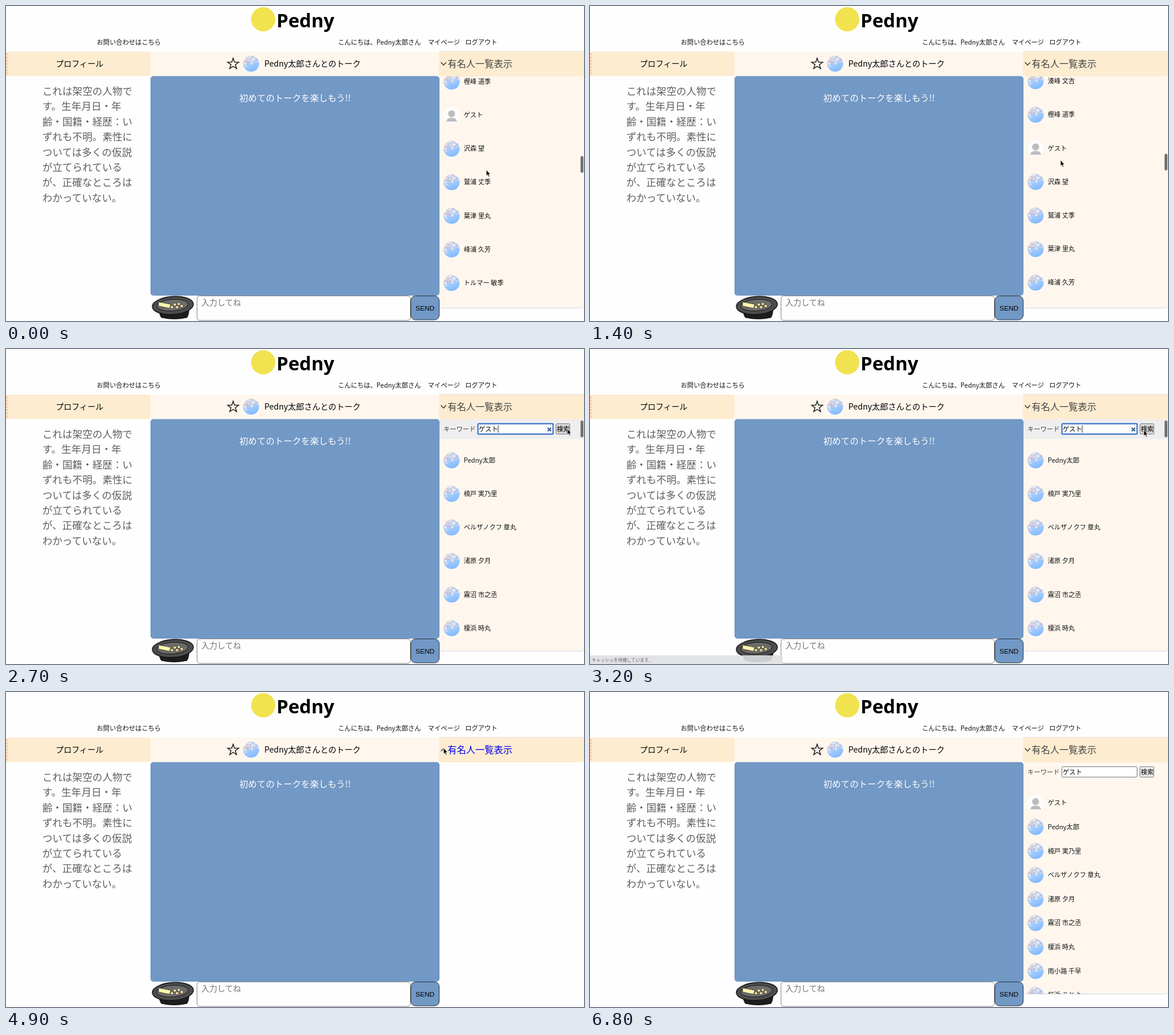
Animation of 1000x546 px, one loop 6900 ms. Source, as an HTML page:

```html
<!DOCTYPE html>
<html lang="ja">
<head>
<meta charset="utf-8">
<title>Pedny</title>
<style>
html, body { margin: 0; width: 100%; height: 100%; overflow: hidden; background: #fefefe; }
svg { display: block; width: 1000px; height: 546px; font-family: "Noto Sans CJK JP", "Noto Sans CJK", sans-serif; }
text { white-space: pre; }
</style>
</head>
<body>
<svg viewBox="0 0 1000 546">
  <defs>
    <clipPath id="panelClip"><path d="M750 122H1000V519Q1000 524 995 524H755Q750 524 750 519Z"/></clipPath>
    <clipPath id="disc"><circle r="14"/></clipPath>
    <linearGradient id="sky" x1=".3" x2=".7" y2="1">
      <stop offset=".1" stop-color="#d5dfee"/><stop offset=".55" stop-color="#a0cafc"/><stop offset="1" stop-color="#7eb7ff"/>
    </linearGradient>
    <g id="photo" clip-path="url(#disc)"><circle r="14" fill="url(#sky)"/></g>
    <g id="guest">
      <circle r="14" fill="#fdfdfd"/>
      <g fill="#bcbcbe"><circle cy="-2.5" r="6"/><path d="M-9 11Q-9 4.5 0 4.5T9 11Z"/></g>
    </g>
  </defs>

  <rect width="1000" height="546" fill="#fefefe"/>
  <circle cx="445" cy="23" r="21" fill="#f1e250"/>
  <text x="468" y="36.5" font-size="32.5" font-weight="700" style="font-family:'Noto Sans','Open Sans',sans-serif">Pedny</text>
  <g font-size="11.1" fill="#111">
    <text x="157" y="67">お問い合わせはこちら</text>
    <text x="574.5" y="67">こんにちは、Pedny太郎さん</text>
    <text x="730" y="67">マイページ</text>
    <text x="794.5" y="67">ログアウト</text>
  </g>

  <g id="panel" clip-path="url(#panelClip)">
    <rect x="750" y="122" width="250" height="403" fill="#fff7ee"/>
    <g id="list">
      <rect id="formBg" x="750" y="122" width="250" height="34" fill="#efeeee"/>
      <g font-size="11.1">
        <text x="757" y="142.5" fill="#444">キーワード</text>
        <rect id="field" x="816.5" y="129.5" width="130" height="18" rx="1" fill="#fff"/>
        <text id="word" x="818" y="142.5"></text>
        <path id="caret" d="M851.5 132.5V145" stroke="#333"/>
        <path id="clear" d="M937 136.5l6 6m0-6l-6 6" stroke="#2b5590" stroke-width="1.8"/>
        <rect id="button" x="951.5" y="129.5" width="24" height="18" rx="2" stroke="#767676"/>
        <text x="953" y="142.5">検索</text>
      </g>
      <g id="rows" font-size="11.1" fill="#111"></g>
    </g>
    <rect id="thumb" x="994" width="5" height="29" rx="2.5" fill="#757371"/>
    <path d="M750 519Q750 523.5 755 523.5H995Q1000 523.5 1000 519" fill="none" stroke="#d3d6e0"/>
  </g>

  <path d="M250 79H750V122H250Z" fill="#fff7ee"/>
  <rect y="79" width="250" height="42.5" rx="3" fill="#fdecd0"/>
  <rect x="749" y="78" width="251" height="44" rx="4" fill="#fdecd0"/>
  <path d="M750 78.5H1000" stroke="#e9e4df"/>
  <path d="M1 82V121" stroke="#f7c9a4" stroke-width="3.5" stroke-dasharray="3.5 2"/>
  <text x="86" y="105.3" font-size="13.8">プロフィール</text>
  <path id="star" fill="none" stroke="#111" stroke-width="1.4"/>
  <use href="#photo" x="424" y="100"/>
  <text x="447" y="105.3" font-size="14">Pedny太郎さんとのトーク</text>
  <path id="chevron" fill="none" stroke="#333" stroke-width="1.4"/>
  <text id="heading" x="764" y="106" font-size="16">有名人一覧表示</text>

  <g id="profile" font-size="17.3" fill="#5f5f5f"></g>
  <rect x="250" y="121.5" width="500" height="380.5" rx="5" fill="#7298c5"/>
  <text x="500" y="165" font-size="15.3" fill="#fff" text-anchor="middle">初めてのトークを楽しもう!!</text>

  <g stroke="#111" stroke-linejoin="round">
    <path d="M264 525Q266 537 269 540Q291 545 313 540Q316 536 317 524Z" fill="#1d1d1d"/>
    <ellipse cx="288.7" cy="519" rx="35.6" ry="15.6" transform="rotate(-4 288.7 519)" fill="#4c4c4c" stroke-width="1.4"/>
    <ellipse cx="288" cy="518.5" rx="27" ry="10" transform="rotate(-4 288 518.5)" fill="#6c6c6c" stroke-width=".9"/>
    <path d="M264 513L285 517 283 524 264 520Z" fill="#fff5ac" stroke-width=".6"/>
    <g fill="#f6e59a" stroke-width=".5">
      <circle cx="287" cy="522" r="2.5"/><circle cx="292" cy="517.5" r="2.5"/><circle cx="296" cy="522" r="2.5"/>
      <circle cx="299" cy="516.5" r="2.4"/><circle cx="304" cy="520" r="2.5"/>
    </g>
  </g>
  <rect x="330.5" y="502.5" width="369" height="42.5" rx="5" fill="#fefefe" stroke="#858585"/>
  <text x="338" y="519" font-size="13.8" fill="#757575">入力してね</text>
  <rect x="700.5" y="502.5" width="49" height="41.5" rx="8" fill="#7298c5" stroke="#2b3440"/>
  <text x="725" y="528" font-size="11.8" text-anchor="middle" style="font-family:'Liberation Sans',Arial,sans-serif">SEND</text>

  <g id="status">
    <path d="M0 531H330Q333 531 333 534V546H0Z" fill="#dfe0e3" fill-opacity=".9"/>
    <text x="3" y="541.5" font-size="7.6" fill="#666">キャッシュを待機しています...</text>
  </g>
  <path id="cursor" d="M0 0V10.5L2.3 8.4 4 12.2 5.7 11.4 4.1 7.8H7.2Z" fill="#000" stroke="#fff" stroke-width=".8"/>
</svg>
<script>
const LOOP = 6900, PITCH = 58.2, TOP = 193, GUEST = 34;
const $ = id => document.getElementById(id);
const add = (parent, tag, attrs, text = '') => {
  const el = document.createElementNS('http://www.w3.org/2000/svg', tag);
  for (const k in attrs) el.setAttribute(k, attrs[k]);
  el.textContent = text;
  return parent.appendChild(el);
};
const set = (id, attrs) => { for (const k in attrs) $(id).setAttribute(k, attrs[k]); };
const show = (id, on) => set(id, { visibility: on ? 'inherit' : 'hidden' });

// blossoms fill the upper left of the avatar picture
let seed = 7;
const rand = () => (seed = seed * 16807 % 2147483647) / 2147483647;
const petals = ['#f8eef1', '#e5cbd4', '#cbb4c2', '#fff', '#e9c3c6', '#b9b3c4'];
for (let i = 0; i < 150; i++) {
  const x = rand() * 28 - 14, y = rand() * 28 - 14;
  if (x * .4 + y < 1) add($('photo'), 'circle', { cx: x, cy: y, r: .6 + rand() * .8, fill: petals[i % 6] });
}

const star = [...Array(10)].map((_, i) => {
  const a = i * Math.PI / 5, r = i % 2 ? 4 : 10;
  return `${393 + r * Math.sin(a)} ${100.5 - r * Math.cos(a)}`;
});
set('star', { d: `M${star.join('L')}Z` });

['これは架空の人物で', 'す。生年月日・年', '齢・国籍・経歴：い', 'ずれも不明。素性に', 'ついては多くの仮説', 'が立てられている', 'が、正確なところは', 'わかっていない。']
  .forEach((line, i) => add($('profile'), 'text', { x: 63, y: 154 + i * 26.4 }, line));

const first = ['Pedny太郎', '楠戸 実乃里', 'ベルザノクフ 章丸', '渚原 夕月', '霧沼 市之丞', '榎浜 時丸', '雨小路 千早', '虹浜 ことよ'];
const last = ['湊峰 文吉', '樫峰 道季', 'ゲスト', '沢森 望', '鷲浦 丈季', '葉津 里丸', '峰浦 久芳', 'トルマー 敏季', '渚原 夕月'];
const names = [...first, ...Array.from({ length: 24 }, (_, i) => first[1 + i % 7]), ...last];
const rows = names.map((name, i) => {
  const row = add($('rows'), 'g', {});
  add(row, 'use', { href: i == GUEST ? '#guest' : '#photo', x: 771 });
  add(row, 'text', { x: 792, y: 3.8 }, name);
  return row;
});

// keys: [time, ...values], eased between neighbours
const cursorKeys = [[0, 831, 284], [1400, 814, 267], [2100, 868, 139], [2400, 868, 139], [2700, 971, 138],
  [3100, 971, 138], [3700, 797, 169], [4500, 757, 97], [5200, 757, 97], [5800, 832, 188], [LOOP, 832, 188]];
const scrollKeys = [[0, 1982.6], [1400, 1925], [2000, 0], [LOOP, 0]];
function at(keys, t) {
  const i = keys.findIndex(k => k[0] > t), a = keys[i - 1], b = keys[i];
  const u = (t - a[0]) / (b[0] - a[0]), e = u * u * (3 - 2 * u);
  return a.slice(1).map((v, j) => v + (b[j + 1] - v) * e);
}

function draw(t) {
  const [x, y] = at(cursorKeys, t), [scroll] = at(scrollKeys, t);
  const found = t >= 5200, open = t < 3300 || found;
  const focus = t >= 2200 && !found;
  const word = found ? 'ゲスト' : 'ゲスト'.slice(0, Math.max(0, (t - 2200) / 100));
  const hover = x > 750 && y > 78 && y < 122;

  show('panel', open);
  set('list', { transform: `translate(0 ${-scroll})` });
  show('thumb', open && !found);
  set('thumb', { y: 124 + scroll * .0686 });
  rows.forEach((row, i) => {
    const place = !found || i > GUEST ? i : i == GUEST ? 0 : i + 1;
    row.setAttribute('transform', `translate(0 ${found ? 192.5 + place * 41.6 : TOP + place * PITCH})`);
  });

  show('formBg', open && !scroll && y > 122 && y < 156);
  set('field', { stroke: focus ? '#2766c8' : '#767676', 'stroke-width': focus ? 2 : 1 });
  $('word').textContent = word;
  show('caret', open && focus);
  set('caret', { transform: `translate(${(word.length - 3) * 11.1} 0)` });
  show('clear', open && focus && word);
  set('button', { fill: t >= 2700 && !found ? '#d8d8d8' : '#efefef' });

  set('heading', { fill: hover ? '#0000f0' : '#444' });
  set('chevron', { d: hover ? 'M752.5 102.5L757 98 761.5 102.5' : 'M752.5 97.5L757 102.5 761.5 97.5' });
  show('status', t >= 3200 && t < 4000);
  show('cursor', t < 6400);
  set('cursor', { transform: `translate(${x} ${y})` });
}

const start = performance.now();
function tick() {
  draw(Math.floor((performance.now() - start) % LOOP / 100) * 100);
  requestAnimationFrame(tick);
}
tick();
</script>
</body>
</html>
```
